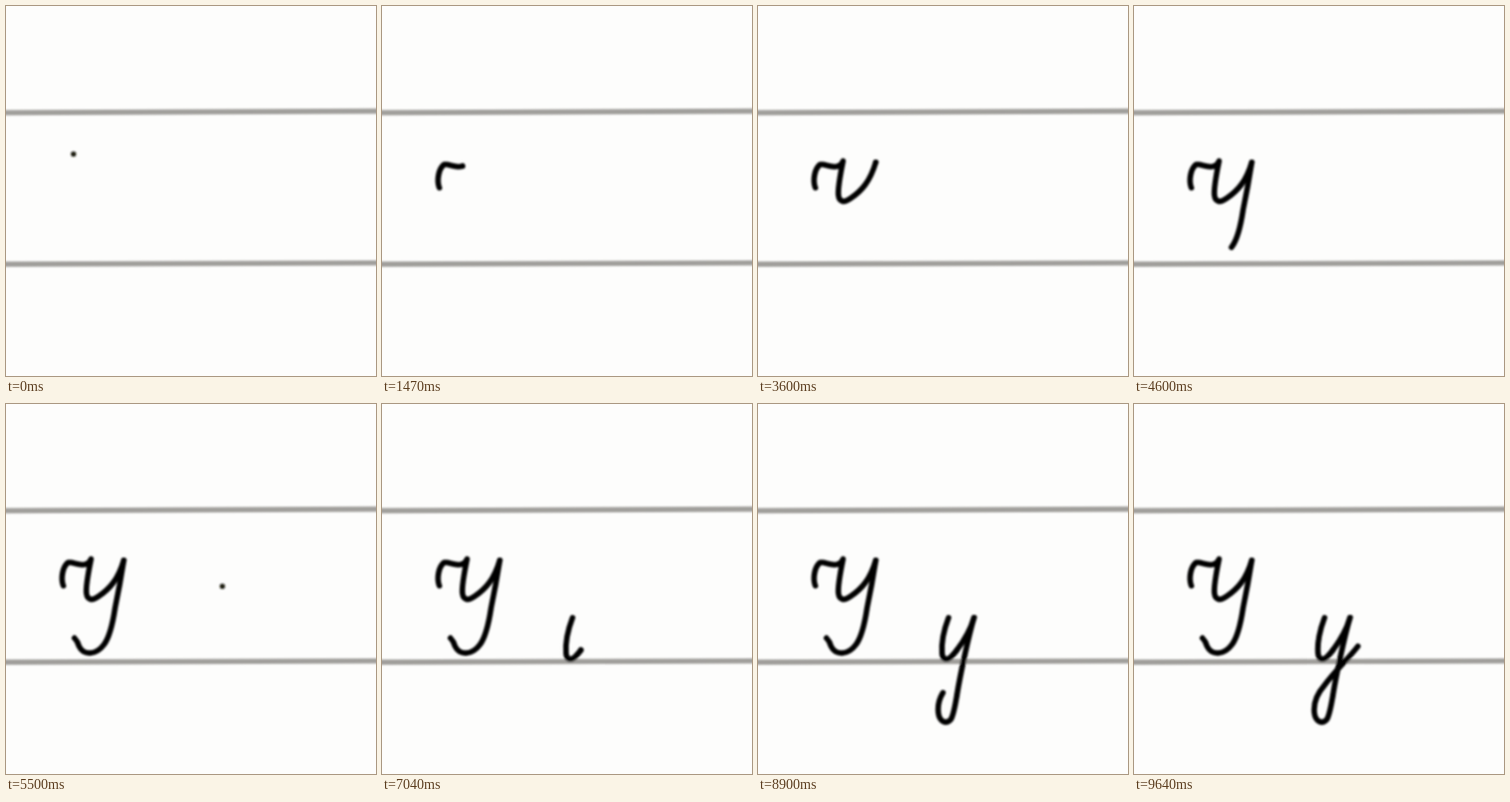
Animation of 400 by 400 pixels, one loop 9.68 s. Source, as an HTML page:

```html
<!DOCTYPE html>
<html lang="en">
<head>
<meta charset="utf-8">
<title>Handwriting</title>
<style>
  html, body { margin: 0; width: 100%; height: 100%; overflow: hidden; background: #fdfdfc; }
  svg { display: block; width: 100vw; height: 100vh; }
  path { fill: none; stroke-linecap: round; stroke-linejoin: round; }
</style>
</head>
<body>
<svg viewBox="0 0 400 400">
  <defs>
    <filter id="soft" filterUnits="userSpaceOnUse" x="-20" y="-20" width="440" height="440">
      <feGaussianBlur stdDeviation="1"/>
    </filter>
  </defs>
  <g filter="url(#soft)">
    <path d="M-15 115.4L415 113.6M-15 279.2L415 277.7" stroke="#a09f9b" stroke-width="5.6"/>
    <g id="ink" stroke="#040404" stroke-width="6"></g>
    <circle id="pen" r="2.9" fill="#1c1c10"/>
  </g>
</svg>
<script>
const LOOP = 9680;
const $ = id => document.getElementById(id);

function addPath(parent, d) {
  const p = document.createElementNS("http://www.w3.org/2000/svg", "path");
  p.setAttribute("d", d);
  return parent.appendChild(p);
}

// Pen strokes: start, end, path
const strokes = [
  [600, 1470, "M62 196.5C59 189 61 176 67 171.5C73 170 78 176 87 173"],
  [1470, 3600, "M87 173C89 172 91 170 92 167.5C89 182 86 197 87 205C88 212 93 213 100 208C112 200 121 190 127.3 169"],
  [3600, 5050, "M127.3 169C124 190 122 201 118 220C115 240 112 252 106 260C97 272 84 272 79 262C78 258 76 255 74 253"],
  [5850, 7040, "M206 231C201 244 198 258 199 270C200 277.5 205 276.5 208 274C211 271 213 269 215 266"],
  [7040, 7600, "M215 266C224 254 230 243 233.5 231"],
  [7600, 8200, "M233.5 231C228 250 219 290 215 315"],
  [8200, 9560, "M215 315C213 327 211 337 208.5 341C203 347 196 343 195 334C193.5 321 199 312 206 304C216 290 232 275 242 262"]
].map(([from, to, d]) => {
  const line = addPath($("ink"), d);
  return { from, to, line, length: line.getTotalLength() };
});

// Pen travel above the paper: start, end, from, to
const hovers = [
  [0, 600, [73, 160], [62, 196.5]],
  [5050, 5500, [74, 253], [234, 197]],
  [5500, 5850, [234, 197], [206, 231]]
];

function draw(t) {
  for (const { from, to, line, length } of strokes) {
    const done = Math.min(1, (t - from) / (to - from));
    line.style.display = done > 0 ? "" : "none";
    line.style.strokeDasharray = done < 1 ? `${Math.max(0, done) * length} 999` : "none";
  }
  const h = hovers.find(([from, to]) => t >= from && t < to);
  $("pen").style.display = h ? "" : "none";
  if (h) {
    const [from, to, a, b] = h, k = (t - from) / (to - from);
    $("pen").setAttribute("cx", a[0] + (b[0] - a[0]) * k);
    $("pen").setAttribute("cy", a[1] + (b[1] - a[1]) * k);
  }
}

const start = performance.now();
function tick() {
  draw((performance.now() - start) % LOOP);
  requestAnimationFrame(tick);
}
tick();
</script>
</body>
</html>
```
